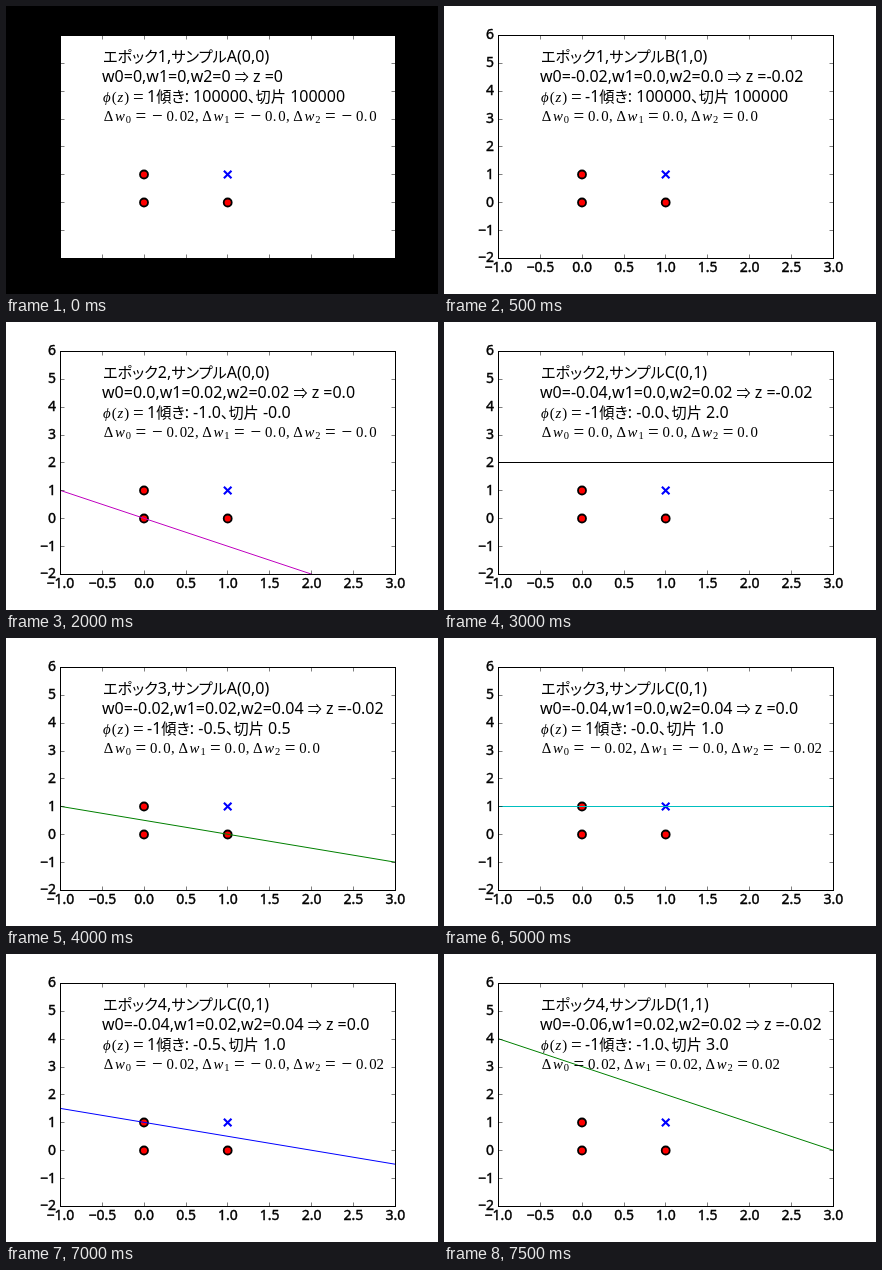
Animation of 432 by 288 pixels, one loop 8 s. Source, as an HTML page:

```html
<!DOCTYPE html>
<html lang="ja">
<head>
<meta charset="utf-8">
<title>Perceptron</title>
<style>
html, body { margin: 0; width: 100%; height: 100%; overflow: hidden; background: #fff; }
svg { display: block; width: 432px; height: 288px; }
text {
  font-family: "Noto Sans", "Open Sans", "Noto Sans CJK JP", sans-serif;
  font-size: 16px; white-space: pre;
}
.tick { font-size: 14px; stroke: #000; stroke-width: .4px; }
.jp, .arrow { font-family: "Noto Sans CJK JP", "Noto Sans CJK", sans-serif; }
.jp { font-size: 15.2px; font-feature-settings: "palt"; }
.arrow { font-size: 14px; }
.math { font-family: "Liberation Serif", "DejaVu Serif", serif; font-size: 14.8px; }
.it { font-style: italic; }
.sub { font-size: 10.5px; }
.op { font-size: 19px; }
</style>
</head>
<body>
<svg viewBox="0 0 432 288">
  <clipPath id="area"><rect x="55" y="30" width="334" height="222"/></clipPath>
  <rect id="back" width="432" height="288"/>
  <rect x="54.5" y="29.5" width="335" height="223" fill="#fff"/>
  <g id="dots"></g>
  <line id="fit" clip-path="url(#area)"/>
  <g id="axes"></g>
  <rect x="54.5" y="29.5" width="335" height="223" fill="none" stroke="#000"/>
  <g id="notes"></g>
</svg>
<script>
const $ = id => document.getElementById(id);
const px = x => 54 + (x + 1) * 83.7;
const py = y => 252 - (y + 2) * 27.9;
const snap = v => Math.floor(v + 0.501) + 0.5;

const STEP = 500;
const SAMPLES = [['A', 0, 0, -1], ['B', 1, 0, -1], ['C', 0, 1, -1], ['D', 1, 1, 1]];
const COLORS = ['#00f', '#008000', '#f00', '#00bfbf', '#bf00bf', '#bfbf00', '#000'];

// Weights are counted in units of 0.02.
function train(epochs) {
  const steps = [];
  let w = [0, 0, 0];
  for (let e = 1; e <= epochs; e++) {
    for (const [name, x1, x2, goal] of SAMPLES) {
      const z = w[0] + w[1] * x1 + w[2] * x2;
      const phi = z >= 0 ? 1 : -1;
      const err = (goal - phi) / 2;
      const delta = [err, err * x1, err * x2];
      const fitted = w[2] !== 0;
      steps.push({
        e, name, x1, x2, w, z, phi, delta, fitted,
        slope: fitted ? -(w[1] / w[2]) : 100000,
        cut: fitted ? -(w[0] / w[2]) : 100000
      });
      w = w.map((v, i) => v + delta[i]);
    }
  }
  return steps;
}

function num(v) {
  const sign = v < 0 || Object.is(v, -0) ? '-' : '';
  const a = Math.round(Math.abs(v) * 100) / 100;
  return sign + (Number.isInteger(a) ? a + '.0' : a);
}
const weight = v => num(v * 0.02);

const text = (x, y, body, attrs = '') => `<text x="${x}" y="${y}" ${attrs}>${body}</text>`;
const span = (cls, body) => `<tspan class="${cls}">${body}</tspan>`;
const jp = body => span('jp', body);

// Advance, class, baseline shift and glyph offset of each formula sign.
const SIGNS = {
  'Δ': [12, '', 0, 0.8], 'w': [10.5, 'it', 0, 0], '=': [18, 'op', 1, 3.5],
  '-': [16.5, 'op', 1, 2], '.': [6, '', 0, 0.5], ',': [7, '', 0, 0.5],
  'ϕ': [8.5, 'it', 0, 0], '(': [5.5, '', 0, 0.3], 'z': [7, 'it', 0, 0.4], ')': [5.5, '', 0, 0.3]
};
function formula(x, y, str) {
  let out = '', prev = '';
  for (const ch of str) {
    const sub = prev === 'w';
    const [adv, cls, dy, dx] = sub ? [6.5, 'sub', 2.3, 0.3] : SIGNS[ch] || [7.3, '', 0, 0];
    out += `<tspan class="${cls}" x="${x + dx}" y="${y + dy}">${ch === '-' ? '−' : ch}</tspan>`;
    x += adv;
    prev = ch;
  }
  return `<text class="math">${out}</text>`;
}

function drawAxes() {
  let out = '';
  const bar = (x, y, w, h) => { out += `<rect x="${x}" y="${y}" width="${w}" height="${h}" fill-opacity=".5"/>`; };
  const label = v => String(v).replace('-', '−');
  for (let v = -1; v <= 3; v += 0.5) {
    const x = snap(px(v)) - 0.5;
    bar(x, 30, 1, 3.5);
    bar(x, 248.5, 1, 3.5);
    out += text(px(v) + 0.5, 266.3, label(v.toFixed(1)), 'class="tick" text-anchor="middle"');
  }
  for (let v = -2; v <= 6; v++) {
    const y = snap(py(v)) - 0.5;
    bar(55, y, 3.5, 1);
    bar(385.5, y, 3.5, 1);
    out += text(50, py(v) + 4.4, label(v), 'class="tick" text-anchor="end"');
  }
  $('axes').innerHTML = out;
}

function drawDots() {
  $('dots').innerHTML = SAMPLES.map(([, a, b, goal]) => {
    const x = px(a) + 0.3, y = snap(py(b));
    return goal > 0
      ? `<path d="M${x - 3.8} ${y - 3.8}l7.6 7.6m0-7.6l-7.6 7.6" stroke="#00f" stroke-width="2.1"/>`
      : `<circle cx="${x}" cy="${y}" r="4" fill="#f00" stroke="#000" stroke-width="1.8"/>`;
  }).join('');
}

function show(i) {
  const s = steps[i];
  const first = i === 0;
  const w = s.w.map((v, k) => `w${k}=${first ? v : weight(v)}`).join(',');
  const z = first ? s.z : weight(s.z);
  const [slope, cut] = [s.slope, s.cut].map(v => s.fitted ? num(v) : v);
  const delta = s.delta.map((v, k) => `Δw${k}=${weight(v)}`).join(',');

  $('back').setAttribute('fill', first ? '#000' : '#fff');
  $('notes').innerHTML =
    text(97, 56.4, `${jp('エポック')}${s.e},${jp('サンプル')}${s.name}(${s.x1},${s.x2})`) +
    text(96, 76.4, `${w} ${span('arrow', '⇒')} z =${z}`) +
    formula(97, 96, 'ϕ(z)=') +
    text(141, 96, `${s.phi}${jp('傾き')}: ${slope}${jp('、切片')} ${cut}`) +
    formula(97, 115, delta);

  const at = x => s.slope * x + s.cut;
  const fix = s.slope === 0 ? snap : v => v;
  const attrs = {
    x1: px(-1), y1: fix(py(at(-1))), x2: px(3.1), y2: fix(py(at(3.1))),
    stroke: s.fitted ? COLORS[i % COLORS.length] : 'none'
  };
  for (const k in attrs) $('fit').setAttribute(k, attrs[k]);
}

const steps = train(4);
let shown = -1;
const start = performance.now();
function tick() {
  const i = Math.floor(Math.max(0, performance.now() - start) / STEP) % steps.length;
  if (i !== shown) show(shown = i);
  requestAnimationFrame(tick);
}
drawAxes();
drawDots();
tick();
</script>
</body>
</html>
```
